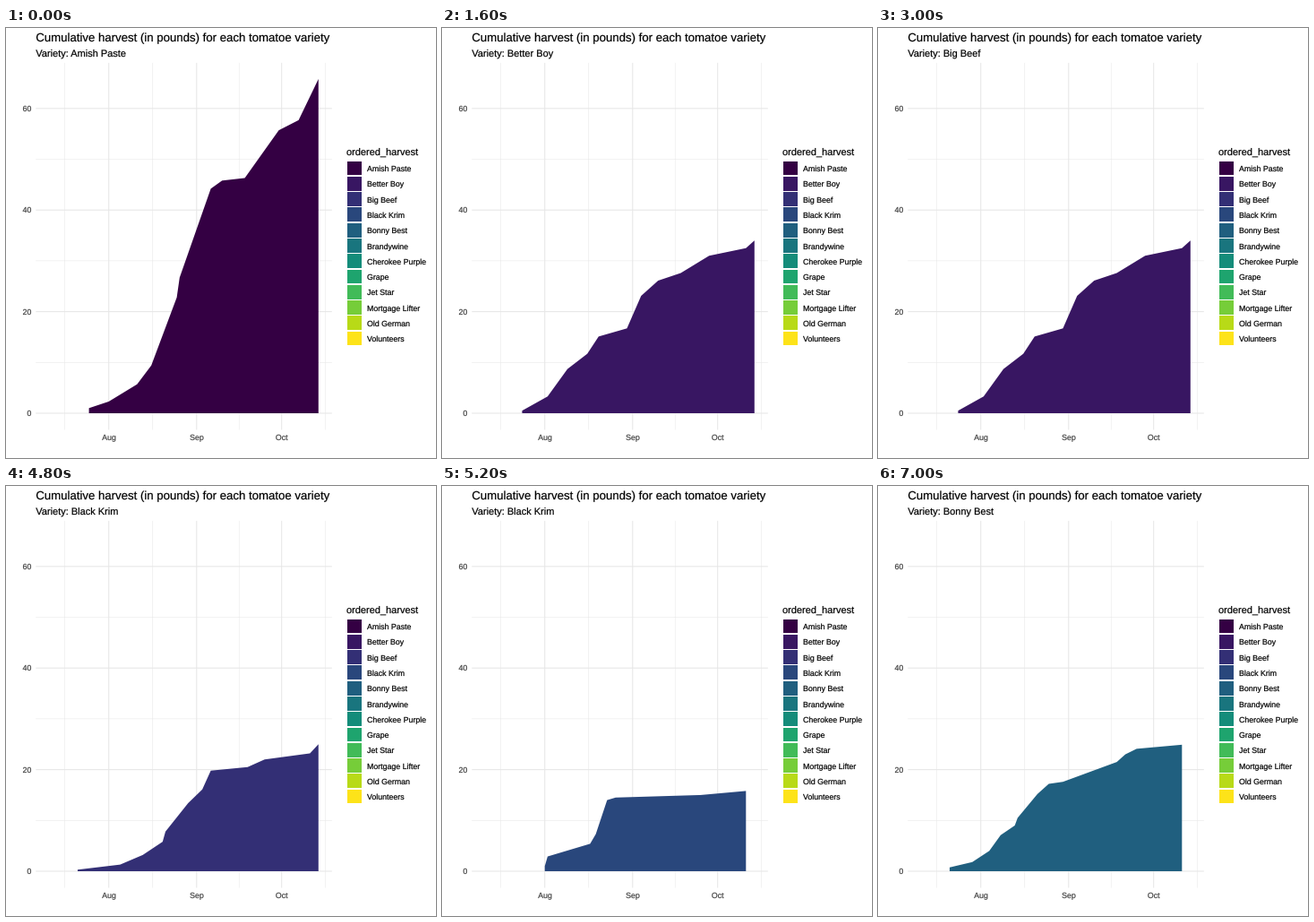
Write a matplotlib script that moves like this. It is 480 px wide and 480 px high and loops after 8000 ms.

```python
import numpy as np
import matplotlib.pyplot as plt
from matplotlib.animation import FuncAnimation
from matplotlib.patches import PathPatch, Polygon, Rectangle
from matplotlib.path import Path
from matplotlib.textpath import TextPath

plt.rcParams["font.family"] = "Liberation Sans"

SIZE, DPI = 480, 72            # at 72 dpi one point is one pixel
STEP, FRAMES = 200, 40
PERIOD = 1800                  # time each variety is on show
LEFT, RIGHT, TOP, BOTTOM = 33.3, 363.8, 38.9, 448.5
GAMMA = 1.2                    # darkens the palette
KEY = 17.28                    # legend row height

NAMES = ["Amish Paste", "Better Boy", "Big Beef", "Black Krim", "Bonny Best",
         "Brandywine", "Cherokee Purple", "Grape", "Jet Star",
         "Mortgage Lifter", "Old German", "Volunteers"]
COLORS = plt.get_cmap("viridis")(np.linspace(0, 1, len(NAMES)))[:, :3] ** GAMMA

# bends of each curve: (days since 1 August, cumulative pounds)
AMISH = [(-7, 1), (0, 2.3), (10, 5.7), (15, 9.4), (24, 22.8), (25, 26.7),
         (36, 44.2), (40, 45.8), (48, 46.3), (60, 55.7), (67, 57.7),
         (74, 65.8)]
BETTER = [(-8, 0.5), (1, 3.3), (8, 8.7), (15, 11.7), (19, 15.1), (29, 16.7),
          (34, 23.1), (40, 26.1), (48, 27.6), (58, 31), (71, 32.5), (74, 34)]
BEEF = [(-11, 0.3), (4, 1.3), (12, 3.2), (19, 5.8), (20, 7.8), (28, 13.4),
        (33, 16.1), (36, 19.8), (49, 20.5), (55, 22), (71, 23.2), (74, 25)]
KRIM = [(0, 1), (1, 2.9), (16, 5.4), (18, 7.3), (22, 14), (25, 14.5),
        (55, 15), (71, 15.8)]
BONNY = [(-11, 0.75), (-3, 1.8), (3, 4), (7, 7.1), (12, 9), (13, 10.5),
         (20, 15.2), (24, 17.2), (29, 17.6), (48, 21.5), (51, 23),
         (55, 24.1), (71, 24.9)]


def px(day):
    return 114.74 + 3.1627 * np.asarray(day)


def py(pounds):
    return 430 - 5.67 * np.asarray(pounds)


def outline(points):
    days, pounds = np.array(points).T
    days = np.r_[days, days[-1], days[0]]
    return np.column_stack([px(days), py(np.r_[pounds, 0, 0])])


def glyphs(x, y, text, size, align=0):
    """Text outline; align is 0 for left, 0.5 for centre, 1 for right."""
    path = TextPath((0, 0), text, size=size)
    shift = align * path.get_extents().x1
    return Path(path.vertices * [1, -1] + [x - shift, np.round(y)], path.codes)


SHAPES = [outline(p) for p in (AMISH, BETTER, BEEF, KRIM, BONNY)]
SUBTITLES = [glyphs(LEFT, 32, "Variety: " + n, 11) for n in NAMES[:len(SHAPES)]]

fig = plt.figure(figsize=(SIZE / DPI, SIZE / DPI), dpi=DPI, facecolor="white")
ax = fig.add_axes([0, 0, 1, 1])
ax.set_xlim(0, SIZE)
ax.set_ylim(SIZE, 0)
ax.axis("off")


def ink(path, color="black"):
    return ax.add_patch(PathPatch(path, fc=color, ec=color, lw=0.2, snap=False))


def grid(days, pounds, width):
    style = dict(color="#e7e7e7", lw=width, solid_capstyle="butt",
                 snap=False, zorder=0.5)
    for x in px(days):
        ax.plot([x, x], [TOP, BOTTOM], **style)
    for y in py(pounds):
        ax.plot([LEFT, RIGHT], [y, y], **style)


months = {"Aug": 0, "Sep": 31, "Oct": 61}
ticks = range(0, 61, 20)
grid([-15.5, 15.5, 46, 76.5], range(10, 60, 20), 0.53)
grid(list(months.values()), ticks, 1.07)

for month, day in months.items():
    ink(glyphs(px(day), 460, month, 8.8, 0.5), "#404040")
for value in ticks:
    ink(glyphs(28, py(value) + 3.2, str(value), 8.8, 1), "#404040")

ink(glyphs(LEFT, 15, "Cumulative harvest (in pounds) for each tomatoe variety",
           13.2))
subtitle = ink(SUBTITLES[0])

ink(glyphs(380, 142, "ordered_harvest", 11))
for i, (name, color) in enumerate(zip(NAMES, COLORS)):
    ax.add_patch(Rectangle((380.9, 148.6 + KEY * i), 15.9, 15.8, fc=color, lw=0))
    ink(glyphs(403, 160.16 + KEY * i, name, 8.8))

area = ax.add_patch(Polygon(SHAPES[0], closed=True, lw=0))


def update(frame):
    t = frame * STEP
    # the subtitle switches 400 ms ahead of the area
    subtitle.set_path(SUBTITLES[(t + 600) // PERIOD])
    shown = (t + 200) // PERIOD
    area.set_xy(SHAPES[shown])
    area.set_facecolor(COLORS[shown])
    return subtitle, area


anim = FuncAnimation(fig, update, frames=FRAMES, interval=STEP,
                     repeat=True, repeat_delay=0)
plt.show()
```
